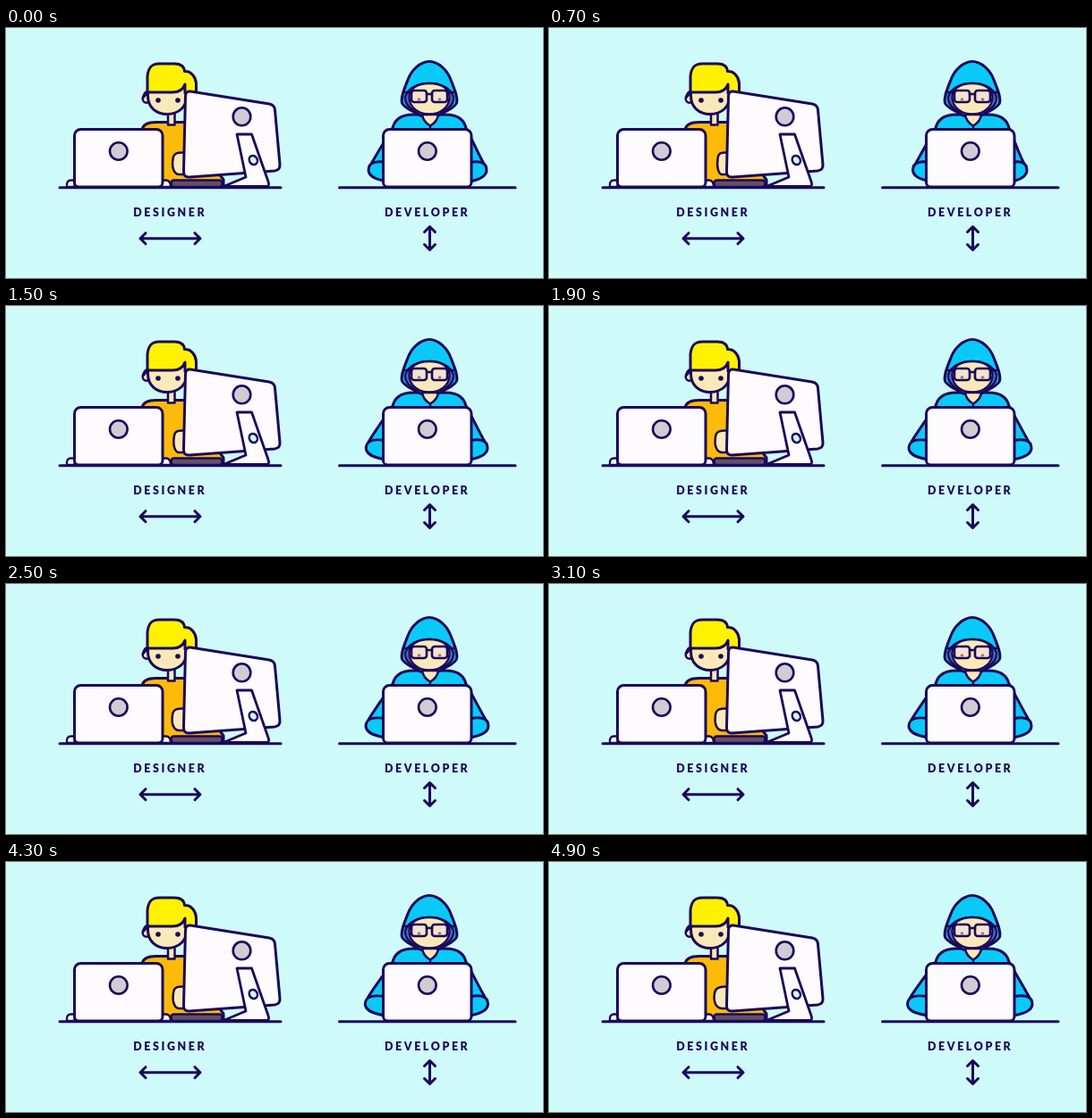
An HTML page with a canvas that plays this animation: 600x280 px, repeating every 5.1 s.

```html
<!DOCTYPE html>
<html lang="en">
<head>
<meta charset="utf-8">
<title>Designer and developer</title>
<style>
  html, body { margin: 0; width: 100%; height: 100%; overflow: hidden; background: #cffafa; }
  canvas { display: block; }
</style>
</head>
<body>
<canvas id="stage" width="600" height="280"></canvas>
<script>
const ctx = document.getElementById('stage').getContext('2d');
const LOOP = 5100;
const INK = '#1b075a', BG = '#cffafa', WHITE = '#fdfbfd', GREY = '#cfcdd3';
const SKIN = '#fae9b8', HAIR = '#fff200', SHIRT = '#fdba08', CYAN = '#09caf7', SHADE = '#5268b4';

// time, left elbow x, right elbow x, designer's hand x
const POSES = [
  [0, 405, 537, 185], [700, 406.5, 534, 187], [1100, 402.5, 537, 188],
  [1900, 402, 539, 184.5], [3100, 402, 539, 184.5], [3700, 402, 537, 187.5],
  [4900, 400.5, 540, 183.5], [5100, 405, 537, 185]
];

function poseAt(t) {
  const i = Math.max(1, POSES.findIndex(p => p[0] >= t));
  const a = POSES[i - 1], b = POSES[i];
  const k = (t - a[0]) / (b[0] - a[0]);
  return a.map((v, j) => v + (b[j] - v) * k);
}

function paint(path, fill, width = 3) {
  if (fill) {
    ctx.fillStyle = fill;
    ctx.fill(path);
  }
  if (width) {
    ctx.lineWidth = width;
    ctx.stroke(path);
  }
}

const shape = (d, fill, width) => paint(new Path2D(d), fill, width);

function ellipse(x, y, rx, ry, fill, width, turn = 0) {
  const p = new Path2D();
  p.ellipse(x, y, rx, ry, turn, 0, Math.PI * 2);
  paint(p, fill, width);
}

function box(x, y, w, h, r, fill, width) {
  const p = new Path2D();
  p.roundRect(x, y, w, h, r);
  paint(p, fill, width);
}

function laptop(x) {
  box(x, 113.5, 98.5, 64.5, [7, 7, 5, 5], WHITE);
  ellipse(x + 49.3, 138, 9.8, 9.8, GREY, 2.6);
}

function label(text, x) {
  ctx.font = '900 12.4px Lato, sans-serif';
  ctx.letterSpacing = '2.6px';
  ctx.fillStyle = INK;
  ctx.fillText(text, x, 211);
}

function designer(hand) {
  // shirt and neck
  shape('M152 114C153 108 159 105.5 168 105.5H198C212 106 216 125 223 143L243 170V178H152Z', SHIRT);
  shape('M181 94V108.5H188.5V94Z', SKIN, 2.5);

  // ear and face
  ellipse(157, 79, 4.3, 4.8, SKIN, 2.5);
  shape('M158.5 68V76C158.5 89 168 96.5 180 96.5C193 96.5 202 88 202 76V62H158.5Z', SKIN);
  ellipse(170, 81, 2.8, 2.8, INK, 0);
  ellipse(192, 81, 2.8, 2.8, INK, 0);

  // hair
  shape('M154 77C154 73 156 72 158 71V54C159 44 163 40 171 40H188C195 40 199 43 199.5 48.5C207 48 212 55 212.5 62V73H200V63C198 69 193 72 186 72H160Q156 73 154 77Z', HAIR);

  // hand and keyboard
  shape(`M200 139.5C192 139 ${hand + 2} 140 ${hand + 1.5} 147C${hand} 157 ${hand + 3} 163.5 193 164H202Z`, SKIN, 2.5);
  box(184.5, 170.5, 57, 7.5, 3, '#625169', 2.6);

  // tilted screen and its stand
  shape('M206 71L294 85Q300 86 300.5 92L306 153Q306.5 159 300 160L205 167Q198 167.5 198.5 160L200.5 76Q201 70.5 206 71Z', WHITE);
  ellipse(263.5, 99.3, 9.8, 10, GREY, 2.6);
  shape('M258 119L274.5 119L293 172Q295 177 291 177.5H243L268 167Z', WHITE, 2.8);
  ellipse(276.3, 148, 4.4, 5.2, BG, 2.5, -0.5);

  shape('M76 178H68Q67 170.5 73 170.5H78Z', WHITE, 2.4);
  shape('M174 170.5H179Q184 171 184 178H174Z', WHITE, 2.4);
  laptop(76.5);
  shape('M60 178.7H307');
}

// One sleeve; dir is -1 for the left side and 1 for the right
function arm(elbow, dir) {
  const x = n => 473 + dir * n;
  const e = dir * (elbow - 473);
  shape(`M${x(39)} 109C${x(45)} 118 ${x(e - 10)} 140 ${x(e - 3)} 152L${x(39)} 160Z`, CYAN);
  shape(`M${x(39)} 153C${x(e - 10)} 147 ${x(e)} 150 ${x(e)} 159` +
    `C${x(e)} 167 ${x(e - 10)} 171 ${x(39)} 173Z`, CYAN);
}

function developer(left, right) {
  arm(left, -1);
  arm(right, 1);
  shape('M431.5 115C433 102 442 97 455 97H491C504 97 513 102 514.5 115Z', CYAN);

  // hood
  shape('M473 37.5C463 37.5 453 47 449 58C445 68 440 80 443 85C448 92 457 94 463 98H483C489 94 498 92 503 85C506 80 501 68 497 58C493 47 483 37.5 473 37.5Z', CYAN);
  shape('M473 62C459 62 449 68 446 77C445 88 456 92 463 98H483C490 92 501 88 500 77C497 68 487 62 473 62Z', SHADE, 2.3);
  shape('M473 62C459 62 450.5 68 450.5 78C451 89 461 96.5 473 96.5C485 96.5 495 89 495.5 78C495.5 68 487 62 473 62Z', SKIN, 2.3);

  // neck opening
  shape('M465 97Q466 105 474 109.5Q482 105 483 97Z', SKIN, 2.4);
  shape('M474 109.5V112', null, 2.4);

  // glasses
  box(453, 70, 17, 13, 3, '#f6e3cf', 2.6);
  box(476, 70, 17, 13, 3, '#f6e3cf', 2.6);
  ellipse(461.5, 80, 1.8, 1.8, '#8e7b90', 0);
  ellipse(484.5, 80, 1.8, 1.8, '#8e7b90', 0);
  shape('M470 74H476M446 72H453M493 72H500', null, 2.5);

  laptop(421.5);
  shape('M372.5 178.7H569');
}

function draw(now) {
  const t = now % LOOP;
  const step = t < 100 ? 0 : 100 + Math.floor((t - 100) / 200) * 200;
  const [, left, right, hand] = poseAt(step);

  ctx.fillStyle = BG;
  ctx.fillRect(0, 0, 600, 280);
  ctx.strokeStyle = INK;
  ctx.lineCap = ctx.lineJoin = 'round';

  designer(hand);
  developer(left, right);
  label('DESIGNER', 142.3);
  label('DEVELOPER', 423);
  shape('M150 235.7H217M156 229.7L150 235.7L156 241.7M211 229.7L217 235.7L211 241.7');
  shape('M473.5 222.5V248.5M467.5 228.5L473.5 222.5L479.5 228.5M467.5 242.5L473.5 248.5L479.5 242.5');
}

const start = performance.now();
function tick() {
  draw(performance.now() - start);
  requestAnimationFrame(tick);
}
tick();
</script>
</body>
</html>
```
